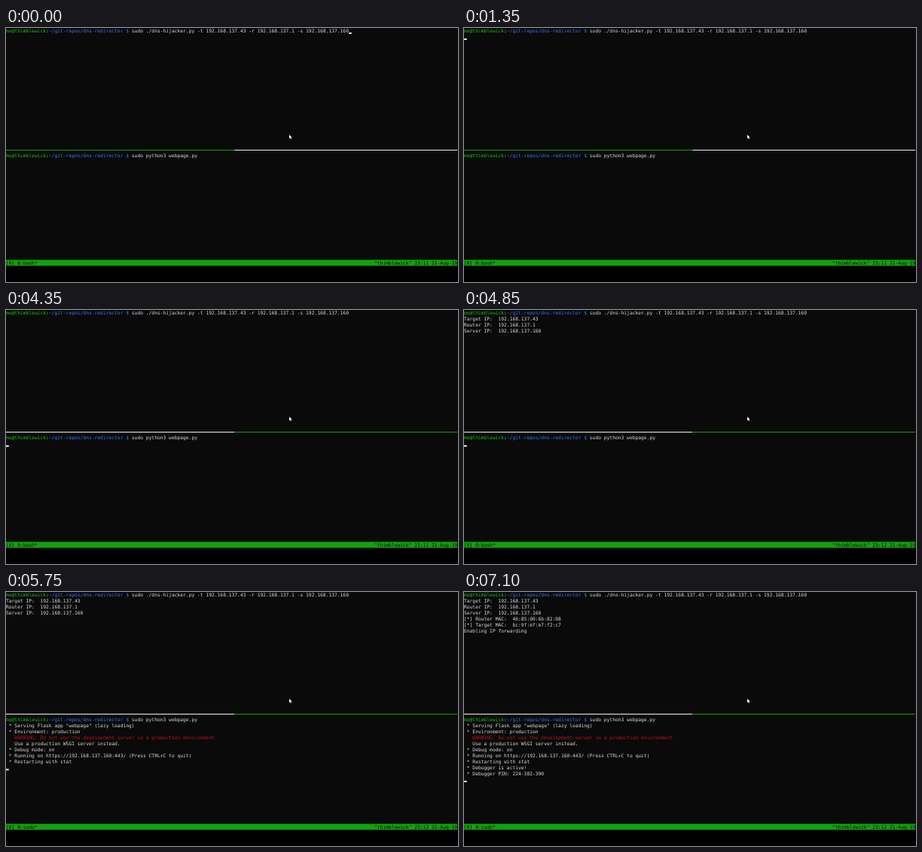
These frames come from a looping animation (600 px wide and 338 px high, 8000 ms). An HTML page:

```html
<!DOCTYPE html>
<html lang="en">
<head>
<meta charset="utf-8">
<title>Terminal session</title>
<style>
  html, body { margin: 0; width: 100%; height: 100%; overflow: hidden; background: #000; }
  svg { display: block; width: 600px; height: 338px; }
  text {
    font: 6.3px "DejaVu Sans Mono", "Noto Sans Mono", monospace;
    font-variant-ligatures: none;
    text-rendering: geometricPrecision;
    white-space: pre;
    fill: #dcdcdc;
  }
  .user { fill: #16c60c; }
  .path { fill: #3b78ff; }
  .warn { fill: #c50f1f; }
  .bar { fill: #0c0c0c; }
</style>
</head>
<body>
<svg id="stage" viewBox="0 0 600 338">
  <rect width="600" height="317" fill="#0a0a0a"/>
</svg>
<script>
const LOOP = 8000, CW = 3.792, RH = 7.91;
const GREEN = '#13a10e', WHITE = '#f2f2f2';
const HOST = 'thimblewick', PANE = 21, STATUS = 39;

const stage = document.getElementById('stage');
const timed = [];

function add(name, attrs, parent = stage) {
  const el = document.createElementNS('http://www.w3.org/2000/svg', name);
  for (const key in attrs) el.setAttribute(key, attrs[key]);
  return parent.appendChild(el);
}

// Show an element only between two moments of the loop
function during(el, from = 0, to = LOOP) {
  if (from > 0 || to < LOOP) timed.push({ el, from, to });
}

// Parts are plain strings or [class, string] pairs
function line(row, col, parts, from, to) {
  const el = add('text', { x: col * CW, y: row * RH + 6.25 });
  for (const part of [].concat(parts)) {
    const [cls, str] = Array.isArray(part) ? part : ['', part];
    add('tspan', { class: cls }, el).textContent = str;
  }
  during(el, from, to);
}

function box(x, y, width, height, fill, from, to) {
  during(add('rect', { x, y, width, height, fill }), from, to);
}

function caret(row, col, from, to) {
  box(col * CW, row * RH + 6, CW, 1.9, WHITE, from, to);
}

function prompt(row, command) {
  line(row, 0, [['user', 'mo@' + HOST], ':', ['path', '~/git-repos/dns-redirector $'], ' ' + command]);
}

// Divider: the green half marks the active pane
const ENTER = 1300, SWITCH = 2900;
const MID = 80 * CW, END = 158 * CW;
function divider(left, right, from, to) {
  box(0, 162, MID, 1, left, from, to);
  box(MID, 162, END - MID, 1, right, from, to);
}
divider(GREEN, WHITE, 0, SWITCH);
divider(WHITE, GREEN, SWITCH, LOOP);

// Upper pane
prompt(0, 'sudo ./dns-hijacker.py -t 192.168.137.43 -r 192.168.137.1 -s 192.168.137.160');
[
  ['Target IP:  192.168.137.43', 4400],
  ['Router IP:  192.168.137.1', 4400],
  ['Server IP:  192.168.137.160', 4400],
  ['[*] Router MAC:  46:85:00:6b:82:08', 7000],
  ['[*] Target MAC:  bc:9f:ef:e7:f2:c7', 7050],
  ['Enabling IP forwarding', 7050]
].forEach(([str, from], i) => line(i + 1, 0, str, from));
caret(0, 120, 0, ENTER);
caret(1, 0, ENTER, SWITCH);

// Lower pane
prompt(PANE, 'sudo python3 webpage.py');
[
  [' * Serving Flask app "webpage" (lazy loading)', 5550],
  [' * Environment: production', 5550],
  [[['warn', '   WARNING: Do not use the development server in a production environment.']], 5550],
  ['   Use a production WSGI server instead.', 5550],
  [' * Debug mode: on', 5550],
  [' * Running on https://192.168.137.160:443/ (Press CTRL+C to quit)', 5600],
  [' * Restarting with stat', 5650],
  [' * Debugger is active!', 7000],
  [' * Debugger PIN: 224-382-390', 7000]
].forEach(([parts, from], i) => line(PANE + 1 + i, 0, parts, from));
[
  [0, 67, SWITCH], [1, 0, 4350], [6, 0, 5550], [7, 0, 5600], [8, 0, 5650], [10, 0, 7000]
].forEach(([row, col, from], i, all) => {
  caret(PANE + row, col, from, i + 1 < all.length ? all[i + 1][2] : LOOP);
});

// Status bar
box(0, STATUS * RH, END, RH, GREEN);
const bar = (col, str, from, to) => line(STATUS, col, [['bar', str]], from, to);
bar(0, '[0] 0:bash*', 0, 5550);
bar(0, '[0] 0:sudo*', 5550);
bar(129, `"${HOST}" 23:11 21-Aug-19`, 0, 4750);
bar(129, `"${HOST}" 23:12 21-Aug-19`, 4750);

// Mouse pointer
add('path', { d: 'M376 142v5.2l1.2-1.1.8 1.8.9-.4-.8-1.8h1.6z', fill: '#fff' });

const start = performance.now();
function draw(now) {
  const t = Math.max(0, now - start) % LOOP;
  for (const { el, from, to } of timed) {
    el.style.visibility = t >= from && t < to ? 'visible' : 'hidden';
  }
  requestAnimationFrame(draw);
}
draw(start);
</script>
</body>
</html>
```
